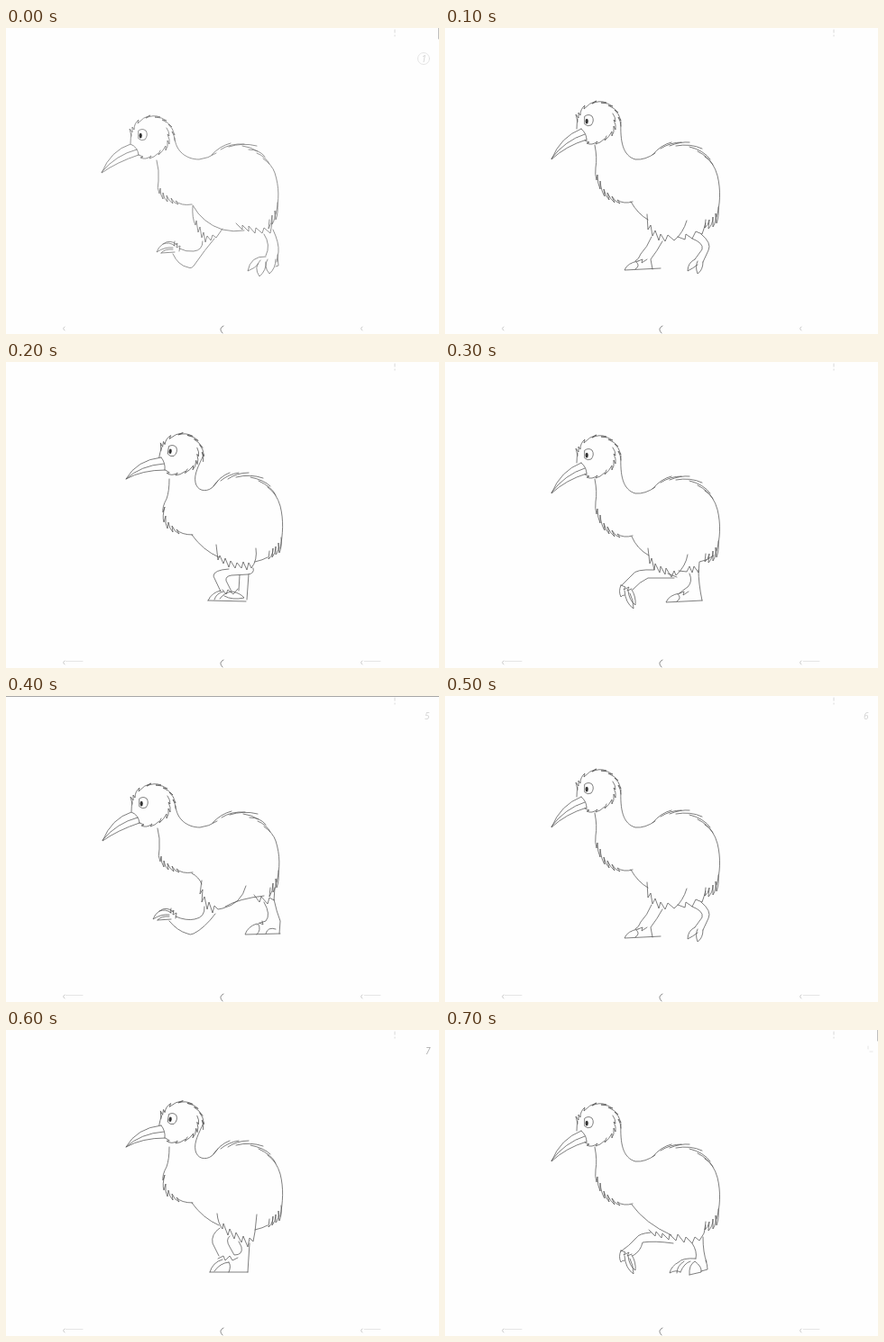
An HTML page without scripts that plays this animation: 480 by 340 pixels, repeating every 0.8 s.

```html
<!DOCTYPE html>
<html lang="en">
<head>
<meta charset="utf-8">
<title>Walking kiwi</title>
<style>
  html, body { margin: 0; width: 100%; height: 100%; overflow: hidden; background: #fefefe; }
  svg { display: block; width: 100%; height: 100%; }
  .ink { fill: none; stroke: #555; stroke-width: .75; stroke-linecap: round; stroke-linejoin: round; }
  .soft { stroke: #737373; }
  .pose { visibility: hidden; animation: show 800ms step-end infinite; animation-delay: calc((var(--i) - 8) * 100ms); }
  @keyframes show { 0% { visibility: visible; } 12.5%, 100% { visibility: hidden; } }
  .page { font: italic 10px "Open Sans", sans-serif; fill: #d2d2d2; stroke: none; }
  .faint { stroke: #ddd; }
</style>
</head>
<body>
<svg viewBox="0 0 480 340" preserveAspectRatio="none">
  <defs>
    <!-- head, centred on the eye -->
    <g id="head">
      <path d="M-12 1L-14 -7L-11 -3L-11 -9L-9 -6Q-9 -13 -4 -17L-5 -13Q1 -20 9 -22L4 -19Q12 -23 20 -20L14 -20Q22 -20 27 -16L22 -17Q29 -14 33 -9L29 -12Q34 -8 36 0L33 -4Q36 1 36 6"/>
      <path d="M-12 -2Q-13 4 -13 9M27 -8Q30 -4 30 1L28 -1Q31 5 30 10L28 6Q29 13 26 17L26 12Q23 18 18 22L20 17M18 20Q13 25 8 26L10 23Q4 28 -2 25L1 24L-4 22"/>
      <path d="M-4 -5Q0 -8 4 -5Q7 0 3 5Q-1 7 -4 4Z"/>
      <ellipse cx="-1.8" cy=".6" rx="1.6" ry="2.8" fill="#333" stroke="none"/>
    </g>

    <g id="low">
      <use href="#head" x="151" y="119"/>
      <path d="M138 129Q116 136 106 161Q123 149 147 141M138 129Q146 132 147 141M145 135Q122 141 106 160"/>
      <path d="M187 122C188 137 200 146 214 146Q224 145 233 139"/>
      <path d="M228 141Q237 131 249 128M238 135Q249 128 264 129M247 132Q262 127 278 131M262 131Q271 132 279 137M269 135Q281 135 287 143M278 139Q288 143 292 151M285 145Q295 152 298 161C303 177 303 191 299 207"/>
      <path d="M301 194Q302 206 299 213L298 203Q299 212 295 218L295 208Q295 217 291 223L292 213"/>
      <path d="M167 147Q170 158 169 170Q167 178 170 184L171 178Q171 186 174 190L174 183Q175 190 179 193L178 186Q181 193 185 195L183 189Q186 195 191 196L188 192Q194 198 206 196"/>
    </g>

    <g id="mid">
      <use href="#head" x="159" y="103"/>
      <path d="M151 112Q128 121 118 146Q134 131 157 124M151 112Q157 117 157 124M155 118Q133 125 118 145"/>
      <path d="M195 104C194 126 197 142 211 146Q222 147 233 139"/>
      <path d="M230 141Q239 130 251 127M239 134Q250 127 262 127M249 131Q261 126 271 127M256 131Q272 128 285 134M271 132Q287 136 294 146M280 137Q292 143 297 152M288 143Q298 149 302 164C306 180 305 197 301 210"/>
      <path d="M303 199Q304 209 301 217L300 206Q301 215 297 221L297 210Q297 218 292 223L293 213Q292 219 288 222L289 213"/>
      <path d="M166 130Q169 145 167 155Q166 163 168 169L169 163Q169 173 172 179L172 170Q173 181 177 187L176 179Q178 187 182 191L180 183Q183 190 188 194L185 187Q189 194 194 195L191 191Q198 196 208 193"/>
    </g>

    <g id="high">
      <use href="#head" transform="translate(184 99) rotate(9)"/>
      <path d="M172 106Q145 109 133 130Q151 120 176 120M172 106Q177 112 176 120M175 113Q149 115 133 130"/>
      <path d="M219 103C214 115 208 124 210 134C212 143 221 145 228 140Q232 136 235 132"/>
      <path d="M230 138Q237 127 248 123M238 132Q246 125 258 123M246 130Q256 123 269 123M255 128Q271 124 285 129M271 128Q286 131 293 138M280 132Q295 139 299 148M290 139Q300 146 304 160C308 176 307 191 304 207"/>
      <path d="M305 195Q306 205 303 212L302 201Q303 210 299 214L299 205Q299 213 295 217L296 207Q296 215 291 219L292 210M290 217Q285 220 276 222"/>
      <path d="M181 130Q181 144 178 152Q173 161 174 167L176 161Q173 172 175 178L177 171Q176 180 179 185L180 178Q181 185 185 189L184 182Q187 189 192 191L189 186Q194 192 207 192"/>
      <path d="M206 192Q218 209 236 217"/>
    </g>

    <!-- lifted feet and planted feet -->
    <g id="kick">
      <path d="M190 241Q182 234 174 240Q169 243 167 249Q176 243 185 244M174 240Q181 237 187 242M172 250Q176 245 185 246M172 250L187 249M187 237L186 242L190 239L189 244L193 242L192 248"/>
    </g>
    <g id="curl">
      <path d="M195 248Q192 255 195 261Q196 259 199 259M199 254Q200 268 209 274Q209 265 205 257M203 254Q204 265 211 270Q212 261 207 253M195 248L200 250L198 253L204 250L202 254L207 252"/>
    </g>
    <g id="flat">
      <path d="M260 257Q248 259 245 267L285 265M258 258Q263 262 257 266M260 257L265 255L264 259L270 255"/>
    </g>
    <g id="claws">
      <path d="M278 254Q263 253 259 258Q251 262 249 270Q256 266 261 269M265 257Q257 262 257 270M261 269Q265 259 272 257M271 272Q270 261 277 257Q285 263 284 269L271 272M284 268L291 266Q291 261 289 256"/>
    </g>

    <!-- both legs just after the step -->
    <g id="step">
      <path d="M206 193Q214 207 225 213M224 207L225 224L228 219L230 231L233 225L237 236L239 229L244 237L247 230L254 236Q264 228 268 214"/>
      <path d="M258 232L266 235L267 229L274 234L278 226L285 229L289 217"/>
      <path d="M229 232Q224 244 217 251Q215 257 211 259M241 237Q235 248 228 257L230 268"/>
      <use href="#flat" x="-46" y="2"/>
      <path d="M274 234Q287 239 285 246L277 257M284 229Q296 239 292 247L286 260M277 257Q269 261 269 270Q275 267 280 263M280 259Q277 265 280 273Q286 269 286 260"/>
    </g>

    <g id="sheet">
      <path d="M65 332Q62 334 65 336M395 332Q392 334 395 336" stroke="#bbb"/>
      <path d="M241 331Q235 334 240 339" stroke="#666"/>
      <path d="M431 2V5M431 8V9" stroke="#ccc"/>
    </g>
    <path id="pegs" class="faint" d="M66 332.5H85M397 332.5H415"/>
  </defs>

  <g class="ink">
    <use href="#sheet"/>

    <g class="pose soft" style="--i:0">
      <use href="#low"/>
      <path d="M207 197Q218 217 240 224Q252 227 264 225"/>
      <path d="M207 198Q206 211 210 219L211 214L213 227L215 221L217 233L219 227L221 238L223 231L227 236L229 230L233 233L240 223"/>
      <path d="M255 217L262 224L262 219L269 226L269 220L276 228L277 222L284 228L286 222L293 228L295 216"/>
      <path d="M218 237Q218 247 208 248Q200 249 192 245M231 234Q220 247 209 263Q206 268 202 266Q191 264 185 251"/>
      <use href="#kick"/>
      <path d="M286 229Q294 241 288 253M296 224Q303 239 302 249L300 260"/>
      <path d="M288 254Q271 253 268 270Q276 267 280 262M282 258Q274 266 281 276Q289 269 288 260M290 257Q285 265 292 273Q299 267 299 257M299 265L302 264L301 252"/>
      <circle cx="463" cy="34" r="6.5" class="faint"/>
      <text x="460.5" y="37.5" class="page">1</text>
      <path d="M479.5 0V12" stroke="#aaa"/>
    </g>

    <g class="pose" style="--i:1">
      <use href="#mid"/>
      <use href="#step"/>
    </g>

    <g class="pose" style="--i:2">
      <use href="#pegs"/>
      <use href="#high"/>
      <path d="M233 203L235 220L237 215L241 224L243 218L247 228L249 221L254 229L256 223L261 229L263 222L267 231L269 223L272 229Q279 220 277 207"/>
      <path d="M247 230Q230 231 230 238L238 255M274 229Q276 235 268 236L250 237Q243 238 244 243L250 255M259 237L258 254M269 236L267 264"/>
      <path d="M224 265Q228 256 238 254M224 265L266 266M231 264Q233 257 241 255M237 263Q242 256 251 255Q260 257 264 262Q251 265 242 260M240 253L244 258L246 253L252 258L257 252"/>
    </g>

    <g class="pose" style="--i:3">
      <use href="#pegs"/>
      <use href="#mid"/>
      <path d="M207 194Q213 208 226 215"/>
      <path d="M225 207L227 224L229 218L232 231L233 224L238 234L239 227L244 236L245 229L251 239L254 232L256 237Q267 227 269 214M247 235L257 239"/>
      <path d="M259 232L268 233L271 227L274 234L276 227L281 234L282 222Q290 221 298 215"/>
      <path d="M232 231Q211 230 208 236L196 248M254 240L225 240Q216 244 208 253"/>
      <use href="#curl"/>
      <path d="M271 235Q275 244 269 250Q263 254 260 257M281 231Q281 246 285 265"/>
      <use href="#flat"/>
    </g>

    <g class="pose" style="--i:4">
      <use href="#pegs"/>
      <use href="#low" x="1"/>
      <path d="M206 197Q214 201 217 209"/>
      <path d="M217 205L215 220L218 215L217 229L220 223L223 237L225 229L229 241L231 233L235 237L240 236Q261 231 266 211M243 234Q258 225 286 222"/>
      <path d="M275 221L281 229L283 223L290 231L292 224L297 227L298 213"/>
      <path d="M220 234Q221 246 209 248Q200 250 188 245M232 242Q220 258 208 264Q204 266 201 264Q190 261 181 250"/>
      <use href="#kick" x="-4" y="-1"/>
      <path d="M286 229Q294 243 288 250Q281 252 278 254M297 226Q300 240 304 250L303 264"/>
      <path d="M278 253Q268 256 265 265L304 264M280 254Q283 260 278 265M288 264Q290 256 299 259M281 252L285 254L284 250"/>
      <path d="M0 .5H480" stroke="#888"/>
      <text x="464" y="26" class="page">5</text>
    </g>

    <g class="pose" style="--i:5">
      <use href="#pegs"/>
      <use href="#mid"/>
      <use href="#step"/>
      <text x="464" y="26" class="page">6</text>
    </g>

    <g class="pose" style="--i:6">
      <use href="#pegs"/>
      <use href="#high"/>
      <path d="M234 204Q235 215 240 221L241 215L246 228L248 221L253 232L255 225L261 236L263 229L268 241L270 231L274 235L276 224L278 205"/>
      <path d="M237 220Q227 227 229 237L236 251M248 229Q243 233 248 241L253 250Q263 250 261 241L258 235M270 237L268 269"/>
      <path d="M226 269Q229 258 240 255M226 269H268M231 268Q237 259 247 258M247 269Q250 262 247 258M235 254L241 251L243 256L248 251L251 256L257 253"/>
      <text x="465" y="27" class="page" style="fill:#aaa">7</text>
    </g>

    <g class="pose" style="--i:7">
      <use href="#pegs"/>
      <use href="#mid"/>
      <path d="M207 194Q222 215 251 228"/>
      <path d="M226 222L233 229L234 224L240 231L241 226L248 233L249 227L256 234L258 227L265 236L267 230L274 237L277 230L282 234L287 226L289 217"/>
      <path d="M228 225Q215 226 212 231Q204 240 195 246M253 237Q232 234 219 236Q217 246 208 251"/>
      <use href="#curl" y="-3"/>
      <path d="M274 237Q280 246 278 254M286 230Q286 248 290 258"/>
      <use href="#claws"/>
      <path d="M469 18V21M471 24H474" class="faint"/>
      <path d="M479.5 0V12" stroke="#aaa"/>
    </g>
  </g>
</svg>
</body>
</html>
```
